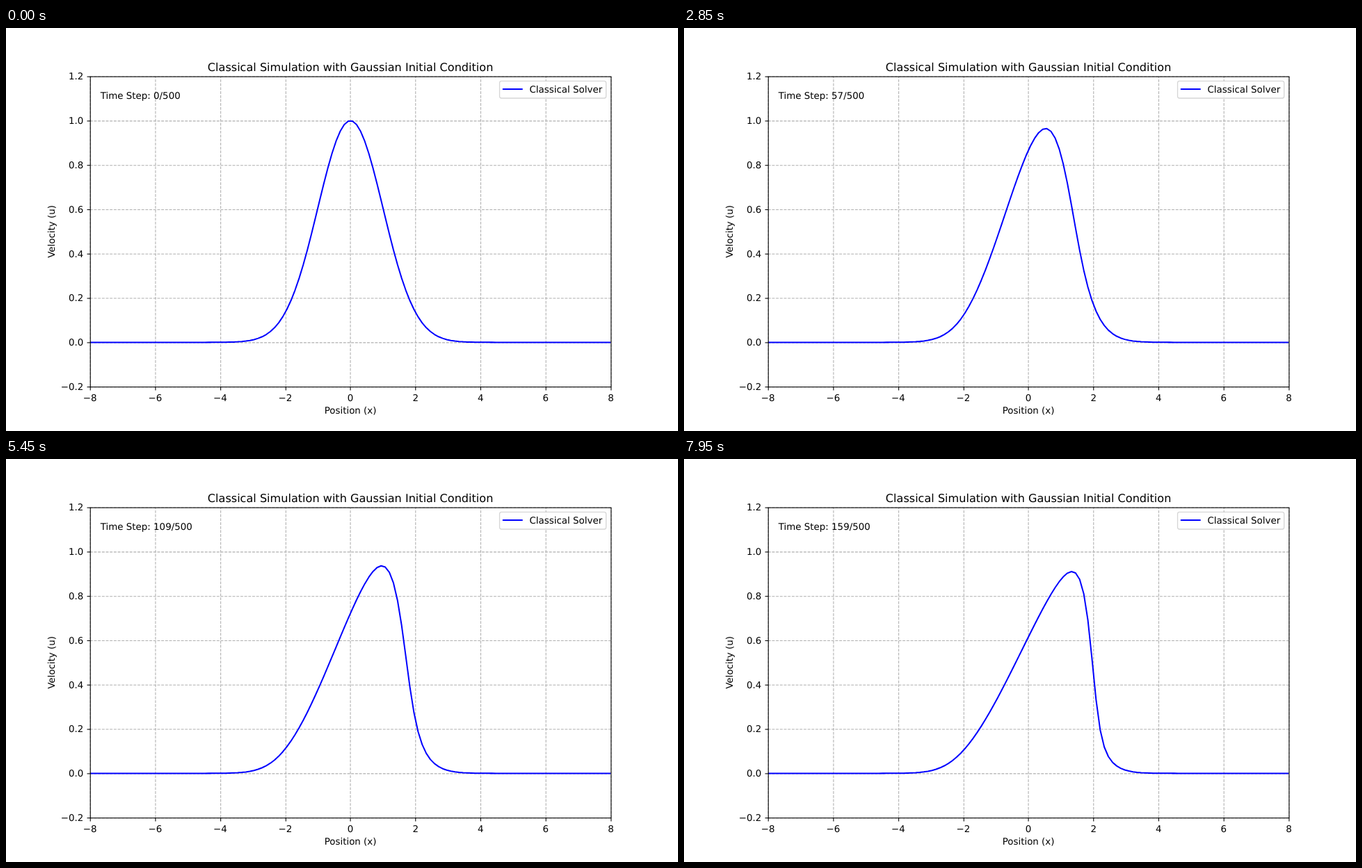
These frames come from a looping animation (966x580 px, 8 s). An HTML page with a canvas:

```html
<!DOCTYPE html>
<html lang="en">
<head>
<meta charset="utf-8">
<title>Classical Simulation</title>
<style>
  html, body { margin: 0; width: 100%; height: 100%; overflow: hidden; background: #fff; }
  canvas { display: block; width: 966px; height: 580px; }
</style>
</head>
<body>
<canvas id="stage" width="966" height="580"></canvas>
<script>
const ctx = document.getElementById("stage").getContext("2d");

// The chart is laid out on a 1000 x 600 sheet at 100 dpi.
const SHEET = { w: 1000, h: 600 };
const AXES = { left: 125, right: 900, top: 72, bottom: 534 };
const PT = 100 / 72;
const STEP_MS = 50, STEPS = 160, TOTAL = 500;

const px = x => AXES.left + (x + 8) / 16 * (AXES.right - AXES.left);
const py = u => AXES.bottom - (u + 0.2) / 1.4 * (AXES.bottom - AXES.top);
const snap = v => Math.floor(v + 0.499) + 0.5;

const xTicks = Array.from({ length: 9 }, (_, i) => -8 + 2 * i);
const yTicks = Array.from({ length: 8 }, (_, i) => (i - 1) / 5);

// Viscous Burgers equation: upwind advection, explicit diffusion.
const N = 128, DX = 16 / (N - 1), DT = 0.01, NU = 0.01;
const grid = Array.from({ length: N }, (_, i) => -8 + i * DX);

function advance(u) {
  return u.map((v, i) => {
    if (i === 0 || i === N - 1) return v;
    const advection = v * (v - u[i - 1]) / DX;
    const diffusion = NU * (u[i + 1] - 2 * v + u[i - 1]) / (DX * DX);
    return v + DT * (diffusion - advection);
  });
}

const states = [grid.map(x => Math.exp(-x * x / 2))];
while (states.length < STEPS) states.push(advance(states[states.length - 1]));

function label(text, x, y, align = "left", size = 10) {
  ctx.font = `${size * PT}px "DejaVu Sans", sans-serif`;
  ctx.textAlign = align;
  ctx.fillStyle = "#000";
  ctx.fillText(text, x, y);
}

function line(x1, y1, x2, y2) {
  ctx.beginPath();
  ctx.moveTo(x1, y1);
  ctx.lineTo(x2, y2);
  ctx.stroke();
}

function pen(color, points) {
  ctx.strokeStyle = color;
  ctx.lineWidth = points * PT;
}

function drawGrid() {
  pen("#b0b0b0", 0.8);
  ctx.setLineDash([3.7 * 0.8 * PT, 1.6 * 0.8 * PT]);
  for (const t of xTicks) line(snap(px(t)), AXES.bottom, snap(px(t)), AXES.top);
  for (const t of yTicks) line(AXES.left, snap(py(t)), AXES.right, snap(py(t)));
  ctx.setLineDash([]);
}

function drawCurve(u) {
  ctx.save();
  ctx.beginPath();
  ctx.rect(AXES.left, AXES.top, AXES.right - AXES.left, AXES.bottom - AXES.top);
  ctx.clip();
  pen("#00f", 1.5);
  ctx.lineJoin = "round";
  ctx.beginPath();
  u.forEach((v, i) => ctx.lineTo(px(grid[i]), py(v)));
  ctx.stroke();
  ctx.restore();
}

function drawFrame() {
  const left = AXES.left + 0.5, bottom = AXES.bottom + 0.5;
  const tick = 3.5 * PT;
  pen("#000", 0.8);
  ctx.strokeRect(left, AXES.top + 0.5, AXES.right - AXES.left, AXES.bottom - AXES.top);
  for (const t of xTicks) {
    line(snap(px(t)), bottom, snap(px(t)), bottom + tick);
    label(String(t).replace("-", "\u2212"), px(t), 555, "center");
  }
  for (const t of yTicks) {
    line(left, snap(py(t)), left - tick, snap(py(t)));
    label(t.toFixed(1).replace("-", "\u2212"), AXES.left - 7 * PT, Math.round(py(t)) + 5, "right");
  }
}

function drawTitles() {
  label("Classical Simulation with Gaussian Initial Condition", 512.5, 64, "center", 12);
  label("Position (x)", 512.5, 574.5, "center");
  ctx.save();
  ctx.translate(72, 303);
  ctx.rotate(-Math.PI / 2);
  label("Velocity (u)", 0, 0, "center");
  ctx.restore();
}

function drawLegend() {
  ctx.beginPath();
  ctx.roundRect(734.5, 79, 158.5, 25.5, 2.8);
  ctx.fillStyle = "rgba(255,255,255,0.8)";
  ctx.fill();
  pen("rgba(204,204,204,0.8)", 1);
  ctx.stroke();
  pen("#00f", 1.5);
  ctx.lineCap = "square";
  line(740, 91, 767.8, 91);
  ctx.lineCap = "butt";
  label("Classical Solver", 779, 96);
}

function draw(step) {
  ctx.setTransform(966 / SHEET.w, 0, 0, 580 / SHEET.h, 0, 0);
  ctx.textRendering = "geometricPrecision";
  ctx.fillStyle = "#fff";
  ctx.fillRect(0, 0, SHEET.w, SHEET.h);
  drawGrid();
  drawCurve(states[step]);
  drawFrame();
  drawTitles();
  label(`Time Step: ${step}/${TOTAL}`, 140.5, 106);
  drawLegend();
}

const start = performance.now();
let shown = -1;

function tick() {
  const step = Math.floor((performance.now() - start) / STEP_MS) % STEPS;
  if (step !== shown) draw(shown = step);
  requestAnimationFrame(tick);
}
tick();
</script>
</body>
</html>
```
